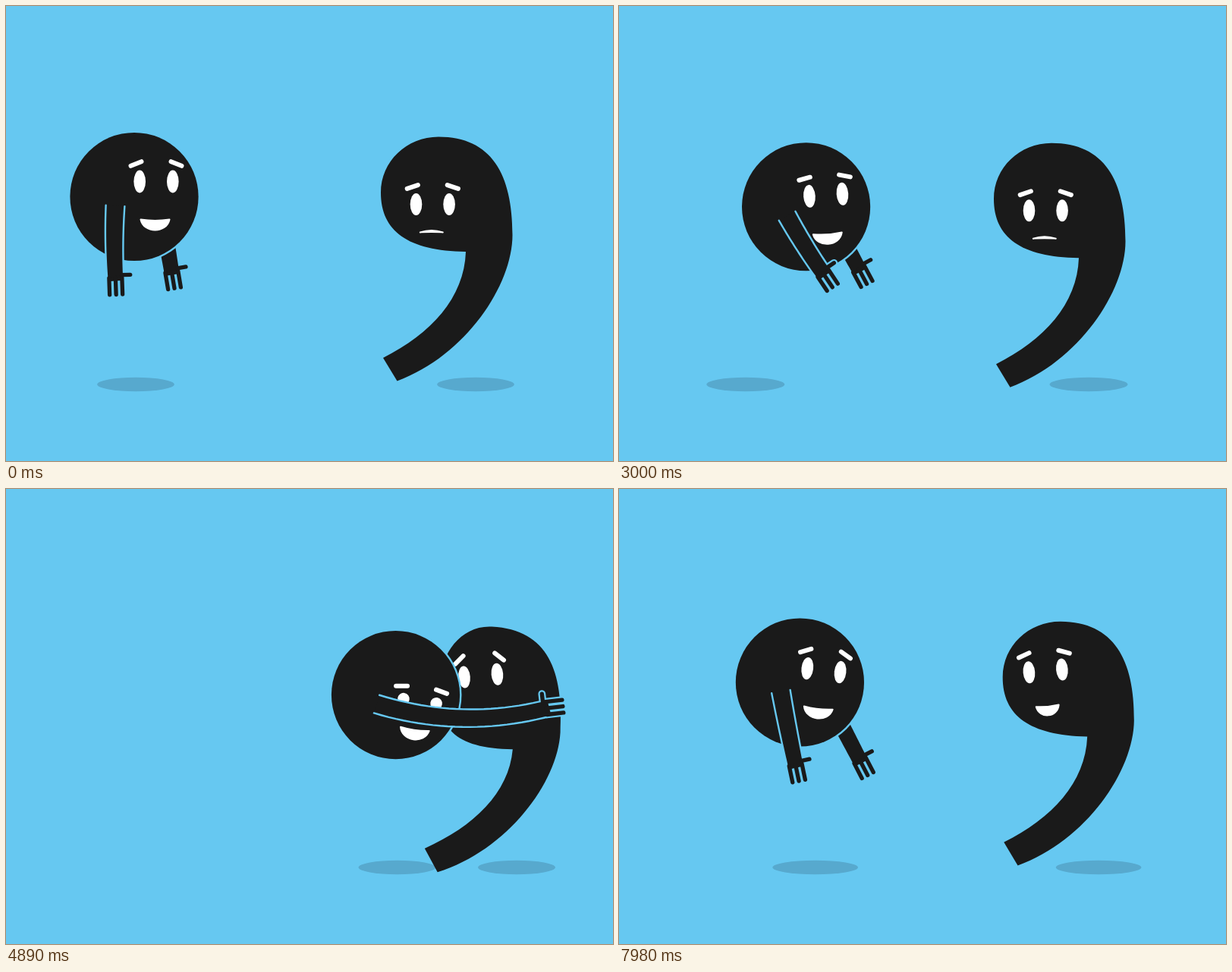
These frames come from a looping animation (800 px wide and 600 px high, 8 s). An HTML page with a canvas:

```html
<!DOCTYPE html>
<html lang="en">
<head>
<meta charset="utf-8">
<title>Hug</title>
<style>
  html, body { margin: 0; width: 100%; height: 100%; overflow: hidden; background: #66c8f1; }
  canvas { display: block; }
</style>
</head>
<body>
<canvas id="stage" width="800" height="600"></canvas>
<script>
const ctx = document.getElementById('stage').getContext('2d');
const SKY = '#66c8f1', INK = '#1a1a1a', SHADE = '#57a9ce', WHITE = '#fff';
const LOOP = 8000, STEP = 30, RADIUS = 84.6, SHADOW_DELAY = 100;

const mix = (a, b, k) => a + (b - a) * k;
const smooth = k => k * k * (3 - 2 * k);
const clamp = k => Math.max(0, Math.min(1, k));

// Eases every property from one key to the next; keys are [time, state].
function tween(keys) {
  return t => {
    let i = 0;
    while (i < keys.length - 2 && t >= keys[i + 1][0]) i++;
    const [t0, from] = keys[i], [t1, to] = keys[i + 1];
    const k = smooth(clamp((t - t0) / (t1 - t0)));
    const state = {};
    for (const name in from) state[name] = mix(from[name], to[name], k);
    return state;
  };
}

// Swings between 0 and 1, turning at the given times.
const swing = (...turns) => {
  const at = tween(turns.map((time, i) => [time, { v: i % 2 }]));
  return t => at(t).v;
};
const bob = swing(0, 1200, 2500, 3350, 4120, 5000, 6600, 7070, 8300);
const spread = swing(350, 1850, 2800, 3750, 4800, 5850, 6930, 7800);

const dotX = tween([
  [0, { x: 169 }], [1640, { x: 164.5 }], [2420, { x: 169 }], [2840, { x: 148.5 }],
  [3310, { x: 513.5 }], [5450, { x: 513.5 }], [6500, { x: 461 }], [7000, { x: 452 }], [8150, { x: 225 }]
]);

const upright = { x: 506, lean: 0, dent: 0, puff: 0 };
const hugged = { x: 560, lean: 3, dent: 11, puff: 5 };
const commaBody = tween([
  [3130, upright], [3330, { x: 560, lean: 6, dent: 21, puff: 0 }], [3560, { x: 559, lean: 5.2, dent: 20, puff: 0 }],
  [4030, hugged], [5400, hugged], [6500, { ...upright, x: 555, lean: 2 }],
  [7000, { ...upright, x: 550.5, lean: 1.6 }], [8150, { ...upright, x: 514, lean: 0.3 }]
]);

// Face and wrists, measured from the centre of the dot.
const calm = {
  x: 29, y: -20, tilt: 0, eye: 15, browL: -22, browR: 22, drop: 50, smile: 1,
  wristX: -24.5, wristY: 111, sag: 3, backX: 50, backY: 103
};
const ready = { ...calm, x: 26.8, y: -13.2, tilt: -2, browL: -8, browR: 8, wristY: 109 };
const reach = {
  ...calm, x: 22.7, y: -26.3, tilt: -14, browL: -52, browR: 25, drop: 53,
  wristX: 262.5, wristY: 4.5, sag: 0, backX: 175, backY: 3
};
const hug = {
  ...reach, x: 32, y: 8.3, tilt: 8, eye: 8, browL: 0, browR: 20, drop: 37,
  wristX: 202.5, wristY: 17, sag: 32
};
const release = { ...hug, y: 0, tilt: 6, browL: -11, browR: 29, drop: 42, wristX: 252, wristY: 34, sag: 0 };
const near = {
  ...calm, y: -17.5, tilt: 2, eye: 13, browL: -27, browR: 36,
  wristX: -32.5, sag: 7, backX: 40, backY: 102
};
const leave = {
  ...near, x: 31.5, y: -16, tilt: 6.5, eye: 14.7, browL: -17,
  wristX: -5, wristY: 112.5, sag: 1, backX: 81, backY: 106.5
};
const dotPose = tween([
  [0, calm], [2310, ready], [2850, ready], [3420, reach], [3560, reach], [4030, hug],
  [5400, hug], [5850, release], [6500, near], [7020, near], [7980, leave]
]);

// Face of the comma, measured from the tip of its tail.
const sad = { x: 56.3, y: -218, tilt: 0, eye: 14.5, browL: -19, browR: 19, drop: 37, smile: 0 };
const shocked = { ...sad, x: 95, y: -232, tilt: 4, browL: -12, browR: 22, drop: 50.5, smile: -0.5 };
const held = { ...sad, x: 65.7, y: -243.7, tilt: -5, browL: -45, browR: 38, drop: 47, smile: 0.6 };
const glad = { ...held, x: 52, y: -244, browL: -25, browR: 15, drop: 46, smile: 0.9 };
const commaPose = tween([
  [3150, sad], [3400, shocked], [3600, shocked], [4100, held], [5300, held],
  [6400, glad], [7020, glad], [7980, { ...glad, x: 46, y: -241.5 }]
]);

function placed(x, y, deg, draw) {
  ctx.save();
  ctx.translate(x, y);
  ctx.rotate(deg * Math.PI / 180);
  draw();
  ctx.restore();
}

function line(x1, y1, x2, y2, width, color) {
  ctx.beginPath();
  ctx.moveTo(x1, y1);
  ctx.lineTo(x2, y2);
  ctx.lineWidth = width;
  ctx.lineCap = 'round';
  ctx.strokeStyle = color;
  ctx.stroke();
}

function oval(x, y, rx, ry, color) {
  ctx.beginPath();
  ctx.ellipse(x, y, rx, ry, 0, 0, Math.PI * 2);
  ctx.fillStyle = color;
  ctx.fill();
}

function drawMouth(half, smile) {
  const top = mix(-2.5, 1.5, smile), low = Math.max(-0.5, mix(-0.5, 14, smile)) / 0.75;
  ctx.beginPath();
  ctx.moveTo(-half, 0);
  ctx.quadraticCurveTo(0, top * 2, half, 0);
  ctx.bezierCurveTo(half * 0.8, low, -half * 0.8, low, -half, 0);
  ctx.closePath();
  ctx.fillStyle = ctx.strokeStyle = WHITE;
  ctx.lineWidth = 2;
  ctx.lineJoin = 'round';
  ctx.fill();
  ctx.stroke();
}

function drawFace(x, y, face, mouthHalf) {
  placed(x + face.x, y + face.y, face.tilt, () => {
    for (const side of [-1, 1]) {
      oval(side * 21.8, 0, 7.8, face.eye, WHITE);
      const angle = side < 0 ? face.browL : face.browR;
      placed(side * 26.5, -face.eye - 8.5, angle - face.tilt, () => line(-7.5, 0, 7.5, 0, 6, WHITE));
    }
    ctx.translate(-1.5, face.drop);
    drawMouth(mouthHalf, face.smile);
  });
}

function drawHand(width, color) {
  [-8.5, 0, 8.5].forEach(y => line(-4, y, 18, y, width, color));
  line(-7.5, -8, -7.5, -19.5, width, color);
}

function drawArm(x, y, sx, sy, wx, wy, sag) {
  const length = Math.hypot(wx - sx, wy - sy);
  const bx = (sx + wx) / 2 - sag * (wy - sy) / length;
  const by = (sy + wy) / 2 + sag * (wx - sx) / length;
  const sides = [[], []], count = 24;
  for (let i = 0; i <= count; i++) {
    const u = i / count;
    const px = mix(mix(sx, bx, u), mix(bx, wx, u), u);
    const py = mix(mix(sy, by, u), mix(by, wy, u), u);
    const a = Math.atan2(mix(by - sy, wy - by, u), mix(bx - sx, wx - bx, u));
    const half = mix(12.4, 11, u);
    sides.forEach((side, k) => {
      const s = k ? -half : half;
      side.push([px - Math.sin(a) * s, py + Math.cos(a) * s]);
    });
  }
  const trace = points => {
    ctx.beginPath();
    points.forEach(p => ctx.lineTo(...p));
  };
  const handAngle = (Math.atan2(wy - by, wx - bx) + Math.atan2(wy - sy, wx - sx)) * 90 / Math.PI;
  placed(x, y, 0, () => {
    placed(wx, wy, handAngle, () => drawHand(9.8, SKY));
    trace([...sides[0], ...sides[1].slice().reverse()]);
    ctx.fillStyle = INK;
    ctx.fill();
    ctx.lineWidth = 2.4;
    ctx.lineCap = 'round';
    ctx.strokeStyle = SKY;
    sides.forEach(side => { trace(side); ctx.stroke(); });
    placed(wx, wy, handAngle, () => drawHand(5.3, INK));
  });
}

function drawComma(x, y, { lean, dent, puff }) {
  placed(x, y, lean, () => {
    ctx.translate(-506, -479.5);
    const top = 172.5 - puff, left = 494 + dent;
    ctx.beginPath();
    ctx.moveTo(570, top);
    ctx.bezierCurveTo(640 + puff, top, 667.5, 222, 667.5, 302);
    ctx.bezierCurveTo(667.5, 368, 606, 461, 515.5, 494.5);
    ctx.lineTo(497, 464);
    ctx.bezierCurveTo(560, 432, 604, 385, 606, 324 + puff * 0.7);
    ctx.bezierCurveTo(530 - dent * 0.1, 323 + dent * 0.25 + puff, 494 + dent * 0.8, 297 + dent * 0.6, left, 246);
    ctx.bezierCurveTo(left, 205, 528 + dent * 0.2, top, 570, top);
    ctx.fillStyle = INK;
    ctx.fill();
  });
}

function render(t) {
  const x = dotX(t).x, y = 251.5 + 21 * bob(t);
  const body = commaBody(t), tailY = 479.5 + 13 * bob(t) - 0.7 * body.lean;
  const pose = dotPose(t), shade = 50.8 + 5.5 * spread(t);

  ctx.fillStyle = SKY;
  ctx.fillRect(0, 0, 800, 600);
  oval(dotX(t - SHADOW_DELAY).x + 2, 499, shade, 9.2, SHADE);
  oval(commaBody(t - SHADOW_DELAY).x + 113, 499, shade, 9.2, SHADE);

  drawArm(x, y, 36, 20, pose.backX, pose.backY, 0);
  drawComma(body.x, tailY, body);
  drawFace(body.x, tailY, commaPose(t), 15);
  oval(x, y, RADIUS + 2.4, RADIUS + 2.4, SKY);
  oval(x, y, RADIUS, RADIUS, INK);
  drawFace(x, y, pose, 19);
  drawArm(x, y, -25, 12, pose.wristX, pose.wristY, pose.sag);
}

const start = performance.now();
function tick() {
  const t = (performance.now() - start) % LOOP;
  render(Math.floor(t / STEP) * STEP);
  requestAnimationFrame(tick);
}
tick();
</script>
</body>
</html>
```
